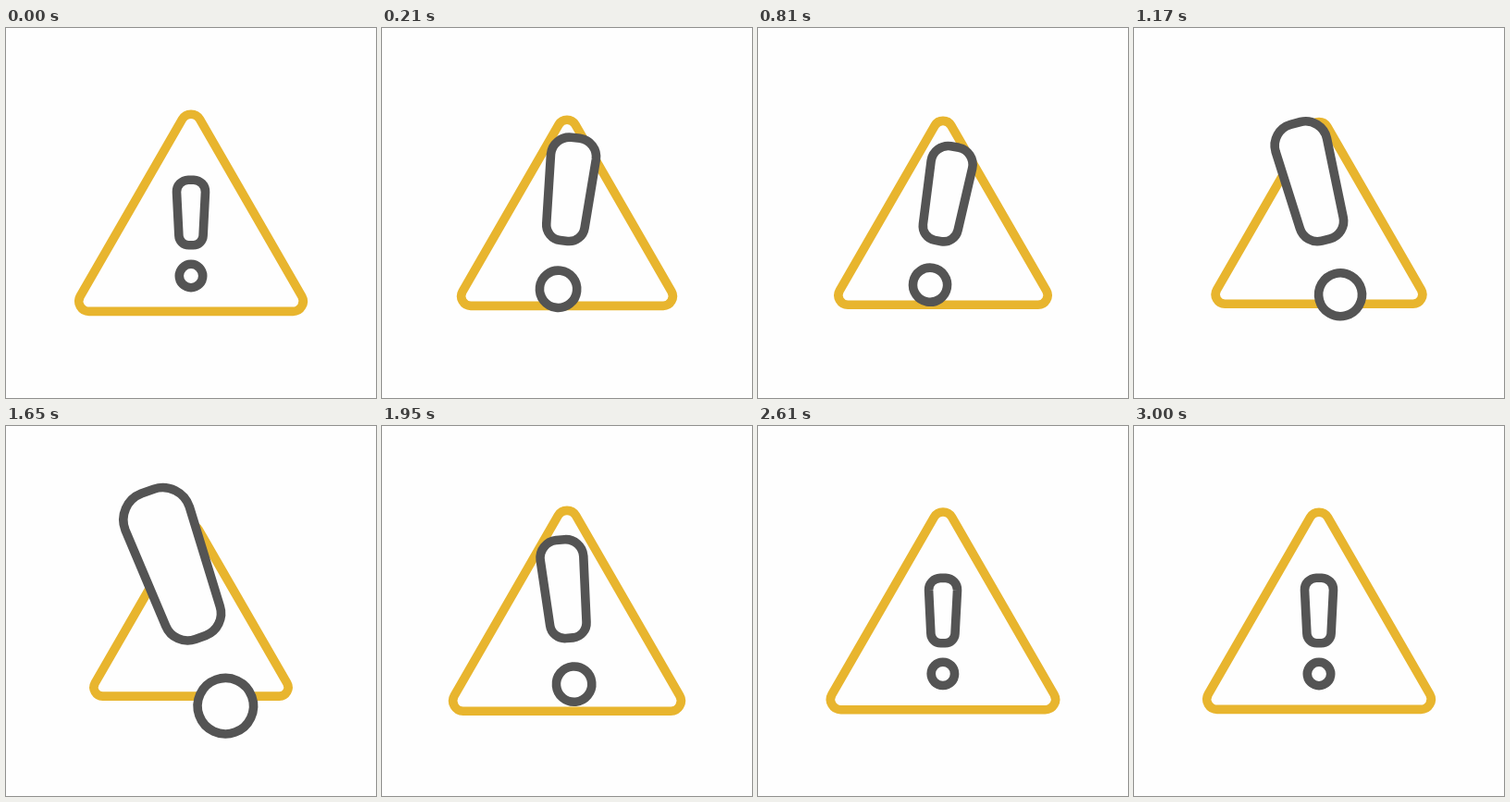
These frames come from a looping animation (400 by 400 pixels, 5030 ms). An HTML page:

```html
<!DOCTYPE html>
<html lang="en">
<head>
<meta charset="utf-8">
<title>Warning sign</title>
<style>
  html, body { margin: 0; width: 100%; height: 100%; overflow: hidden; background: #fefefe; }
  svg { display: block; width: 100%; height: 100%; }
  path, circle { fill: #fefefe; stroke: #545454; stroke-width: 9.6; vector-effect: non-scaling-stroke; }
  #triangle { stroke: #e8b52e; }
</style>
</head>
<body>
<svg viewBox="-200 -200 400 400">
  <path id="triangle" d="M-110.3 106.4H110.3A11 11 0 0 0 119.8 90L9.5 -101.3A11 11 0 0 0 -9.5 -101.3L-119.8 90A11 11 0 0 0 -110.3 106.4Z"/>
  <g id="mark">
    <path d="M-3 -58.3H3A12.8 12.8 0 0 1 15.5 -45.2L13.1 2A10.7 10.7 0 0 1 2.5 12.3H-2.5A10.7 10.7 0 0 1 -13.1 2L-15.5 -45.2A12.8 12.8 0 0 1 -3 -58.3Z"/>
    <circle cy="45.5" r="12.7"/>
  </g>
</svg>
<script>
const LOOP = 5030, STEP = 30;
// Moments in ms: first swell, dip, second swell, start of the return, overshoot, rest
const SWELL = 467, DIP = 930, SWELL_AGAIN = 1400, RETURN = 1640, OVERSHOOT = 2200, REST = 2650;

const triangle = document.getElementById('triangle');
const mark = document.getElementById('mark');

// Eased step from 0 to 1
function ramp(t, start, end) {
  const u = Math.min(1, Math.max(0, (t - start) / (end - start)));
  return u * u * (3 - 2 * u);
}

// Rises to 1, falls back by depth, rises again and returns to 0
function swell(t, depth, again) {
  const dip = depth * (ramp(t, SWELL, DIP) - ramp(t, DIP, again));
  return Math.max(0, ramp(t, 0, SWELL) - dip - ramp(t, RETURN, OVERSHOOT));
}

function draw() {
  const t = Math.floor(performance.now() % LOOP / STEP) * STEP;
  const back = ramp(t, RETURN, OVERSHOOT), settle = ramp(t, OVERSHOOT, REST);
  const overshoot = back - settle;
  const size = swell(t, 0.8, SWELL_AGAIN);

  const triangleScale = 1 - 0.134 * swell(t, 0.6, 1600) + 0.127 * overshoot;
  const markScale = 1 + 1.38 * size - 0.12 * overshoot;
  const offset = 22.5 - 21.5 * size ** 0.7;
  const angle = 20 * ramp(t, 0, 550) - 40 * ramp(t, 550, 1355) + 25 * back - 5 * settle;

  triangle.setAttribute('transform', `scale(${triangleScale})`);
  mark.setAttribute('transform', `rotate(${angle}) translate(0 ${offset}) scale(${markScale})`);
  requestAnimationFrame(draw);
}
draw();
</script>
</body>
</html>
```
